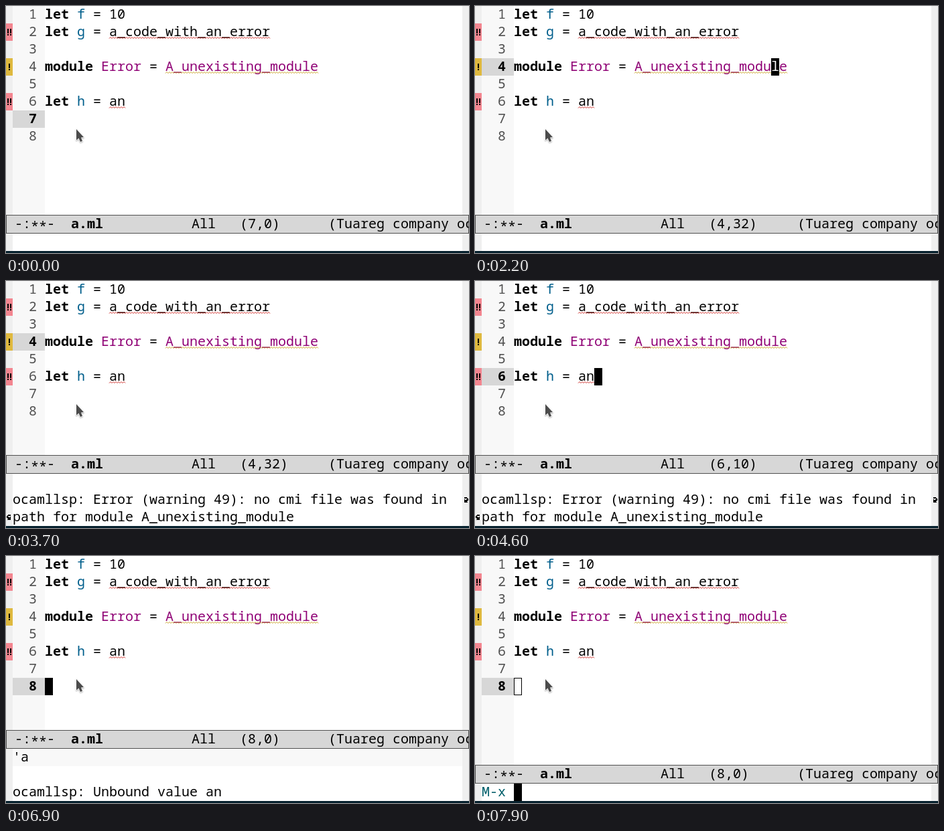
An HTML page with a canvas for the animation above (8 s loop, 691 by 369 pixels).

```html
<!DOCTYPE html>
<html lang="en">
<head>
<meta charset="utf-8">
<title>Editor diagnostics</title>
<style>
html, body { margin: 0; width: 100%; height: 100%; overflow: hidden; background: #fff; }
canvas { display: block; }
</style>
</head>
<body>
<canvas id="stage" width="691" height="369"></canvas>
<script>
const ctx = document.getElementById('stage').getContext('2d');
const W = 691, H = 369, ROW = 26, CELL = 12, LEFT = 58, ECHO_X = 10, BASE = 19;
const LOOP = 8000;
const FONT = '20px "Noto Sans Mono", "DejaVu Sans Mono", monospace';
const INK = '#000', BLUE = '#005e8b', PURPLE = '#8f0075', DIM = '#505050';
const FRINGE = '#efefef', PALE = '#f8f8f8', ACTIVE = '#d7d7d7';
const RED = '#d0302c', GOLD = '#c9a227';

// Each line: [text, colour, bold] runs
const code = [
  [['let', INK, true], [' f', BLUE], [' = 10', INK]],
  [['let', INK, true], [' g', BLUE], [' = a_code_with_an_error', INK]],
  [],
  [['module', INK, true], [' Error', PURPLE], [' = ', INK], ['A_unexisting_module', PURPLE]],
  [],
  [['let', INK, true], [' h', BLUE], [' = an', INK]],
  [],
  []
];
const marks = [
  { line: 2, col: 8, len: 20, wave: RED, fill: '#f38690', bars: [2, 6] },
  { line: 4, col: 15, len: 19, wave: GOLD, fill: '#dfb93f', bars: [4] },
  { line: 6, col: 8, len: 2, wave: RED, fill: '#f38690', bars: [2, 6] }
];
const curlLeft = [0x3c, 0x7c, 0xc0, 0xe4, 0xfc, 0x7c, 0x3c, 0x7c];
const curlRight = [0x3c, 0x3e, 0x03, 0x27, 0x3f, 0x3e, 0x3c, 0x3e];

const WARNING = ['', 'ocamllsp: Error (warning 49): no cmi file was found in',
  'path for module A_unexisting_module'];
const UNBOUND = ["'a", '', 'ocamllsp: Unbound value an'];

// State changes, merged in order of time
const steps = [
  [0, { line: 7, col: 0, pos: '7,0', cursor: 'off', echo: [''], prompt: false }],
  [400, { cursor: 'on' }],
  [900, { line: 6 }],
  [1000, { pos: '6,0' }],
  [1200, { line: 5, pos: '5,0' }],
  [1300, { line: 4, pos: '4,0' }],
  [1800, { col: 34, pos: '4,34' }],
  [2000, { col: 33, pos: '4,33' }],
  [2200, { col: 32, pos: '4,32' }],
  [2700, { cursor: 'off', echo: WARNING }],
  [3200, { cursor: 'on' }],
  [3700, { cursor: 'off' }],
  [4200, { line: 5, col: 0, pos: '5,0', cursor: 'on' }],
  [4600, { line: 6, col: 10, pos: '6,10' }],
  [5100, { col: 9, pos: '6,9' }],
  [5200, { col: 8, pos: '6,8' }],
  [5700, { cursor: 'off', echo: UNBOUND }],
  [6200, { cursor: 'on' }],
  [6700, { line: 7, col: 0 }],
  [6800, { pos: '7,0' }],
  [6900, { line: 8, pos: '8,0' }],
  [7400, { cursor: 'off', echo: [''] }],
  [7900, { cursor: 'hollow', prompt: true }]
];

function stateAt(t) {
  const s = {};
  for (const [at, change] of steps) if (at <= t) Object.assign(s, change);
  return s;
}

function box(x, y, w, h, color) {
  ctx.fillStyle = color;
  ctx.fillRect(x, y, w, h);
}

function text(str, x, y, color = INK, bold = false) {
  ctx.font = (bold ? 'bold ' : '') + FONT;
  ctx.fillStyle = color;
  ctx.fillText(str, x, y);
}

function clipped(x, y, w, h, paint) {
  ctx.save();
  ctx.beginPath();
  ctx.rect(x, y, w, h);
  ctx.clip();
  paint();
  ctx.restore();
}

function drawRuns(line, color) {
  let x = LEFT;
  for (const [str, ink, bold] of code[line - 1]) {
    text(str, x, (line - 1) * ROW + BASE, color || ink, bold);
    x += str.length * CELL;
  }
}

function wave(m) {
  const x0 = LEFT + m.col * CELL, y = (m.line - 1) * ROW + BASE + 1.5;
  ctx.strokeStyle = m.wave;
  ctx.lineWidth = 1;
  ctx.beginPath();
  for (let i = 0; i <= m.len * CELL / 2; i++) ctx.lineTo(x0 + i * 2, y + (i % 2 ? 0 : 2));
  ctx.stroke();
}

function bitmap(rows, x, y) {
  rows.forEach((bits, r) => {
    for (let c = 0; c < 8; c++) if (bits & (128 >> c)) box(x + c, y + r, 1, 1, INK);
  });
}

function drawBuffer(s, bottom) {
  box(10, 0, LEFT - 10, bottom, PALE);
  for (let n = 1; n <= code.length; n++) {
    const y = (n - 1) * ROW, current = n === s.line;
    if (current) box(10, y, LEFT - 10, ROW, ACTIVE);
    text(String(n), 34, y + BASE, current ? INK : DIM, current);
    drawRuns(n);
  }
  for (const m of marks) {
    const y = (m.line - 1) * ROW;
    wave(m);
    box(0, y, 10, ROW, m.fill);
    for (const x of m.bars) {
      box(x, y + 8, 2, 7, INK);
      box(x, y + 16, 2, 2, INK);
    }
  }
}

function drawCursor(s) {
  const x = LEFT + s.col * CELL, y = (s.line - 1) * ROW;
  if (s.cursor === 'on') {
    clipped(x, y, CELL, ROW, () => {
      box(x, y, CELL, ROW, INK);
      drawRuns(s.line, '#fff');
    });
  } else if (s.cursor === 'hollow') {
    ctx.strokeStyle = INK;
    ctx.lineWidth = 1;
    ctx.strokeRect(x + 0.5, y + 0.5, CELL - 1, ROW - 1);
  }
}

function drawPointer() {
  ctx.save();
  ctx.shadowColor = 'rgba(0,0,0,.35)';
  ctx.shadowBlur = 2;
  ctx.shadowOffsetY = 1;
  ctx.beginPath();
  [[105, 184], [105, 200.5], [108.5, 197.5], [111, 203], [114, 201.8], [112, 196.5], [116, 196]]
    .forEach(([x, y]) => ctx.lineTo(x, y));
  ctx.closePath();
  ctx.lineJoin = 'round';
  ctx.lineWidth = 1.6;
  ctx.strokeStyle = '#fff';
  ctx.stroke();
  ctx.shadowColor = 'transparent';
  ctx.fillStyle = '#4b4b4b';
  ctx.fill();
  ctx.restore();
}

function drawModeLine(s, y) {
  box(0, y, W, ROW + 2, DIM);
  box(1, y + 1, W - 2, ROW, ACTIVE);
  const base = y + 1 + BASE, at = col => 13 + col * CELL;
  clipped(1, y + 1, W - 2, ROW, () => {
    text('-:', at(0), base);
    text('**', at(2), base + 4);
    text('-', at(4), base);
    text('a.ml', at(7), base, INK, true);
    text('All', at(22), base);
    text('(' + s.pos + ')', at(28), base);
    text('(Tuareg company oc', at(39), base);
  });
}

function drawEcho(s, top) {
  if (s.echo === UNBOUND) box(10, top, W - 20, ROW, PALE);
  s.echo.forEach((str, i) => text(str, ECHO_X, top + i * ROW + BASE));
  if (s.echo === WARNING) {
    bitmap(curlRight, 682, top + ROW + 9);
    bitmap(curlLeft, 1, top + 2 * ROW + 9);
  }
  if (s.prompt) {
    text('M-x', ECHO_X, top + BASE, '#005f6b');
    box(ECHO_X + 4 * CELL, top, CELL, ROW, INK);
  }
}

function draw(t) {
  const s = stateAt(t);
  const echoTop = 366 - s.echo.length * ROW, modeTop = echoTop - ROW - 2;
  box(0, 0, W, H, '#fff');
  box(0, 0, 10, H, FRINGE);
  box(W - 10, 0, 10, H, FRINGE);
  drawBuffer(s, modeTop);
  drawCursor(s);
  drawPointer();
  drawModeLine(s, modeTop);
  drawEcho(s, echoTop);
  box(0, 366, W, 3, '#06212e');
}

const start = performance.now();
function tick() {
  draw((performance.now() - start) % LOOP);
  requestAnimationFrame(tick);
}
tick();
</script>
</body>
</html>
```
